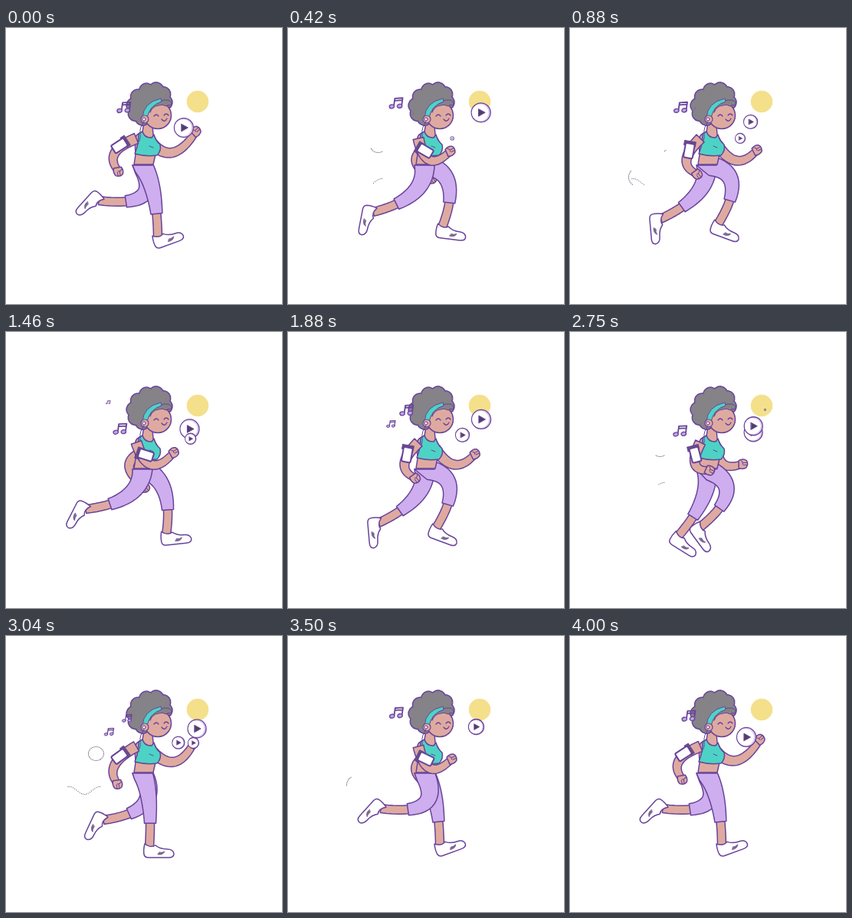
These frames come from a looping animation (360x360 px, 4.04 s). An HTML page with a canvas:

```html
<!DOCTYPE html>
<html lang="en">
<head>
<meta charset="utf-8">
<title>Runner</title>
<style>
html, body { margin: 0; width: 100%; height: 100%; overflow: hidden; background: #fff; }
canvas { display: block; }
</style>
</head>
<body>
<canvas id="stage" width="360" height="360"></canvas>
<script>
const ctx = document.getElementById('stage').getContext('2d');
const LOOP = 4040, STRIDE = 24, FPS = 24;
const INK = '#68439a', SKIN = '#deaaa0', PANTS = '#ceaeee', TEAL = '#4dd3c5', HAIR = '#858288', LILAC = '#dcc6f2';

// Key poses of one stride. Step, ankle x y, shoe angle
const LEG = [
  [0, 198, 273, -20], [1, 187, 275, 0], [5, 149, 272, 14], [9, 118, 249, 85], [11, 104, 231, 117],
  [12, 121, 225, 132], [13, 127, 240, 115], [17, 162, 254, 65], [21, 193, 256, 20], [23, 209, 264, -6]
];
// Step, elbow x y, hand x y, phone angle
const NEAR_ARM = [
  [0, 142, 163, 146, 186, -33], [1, 142, 168, 145, 192, -36],
  [11, 190, 173, 218, 158, -162], [21, 152, 172, 165, 190, -80]
];
const FAR_ARM = [
  [0, 219, 162, 247, 136], [1, 220, 164, 244, 141],
  [11, 161, 172, 180, 202], [21, 217, 173, 243, 160]
];
// Start ms, life ms, sideways shift, radius
const BUBBLES = [
  [3640, 950, 0, 12.5], [350, 960, -2, 9], [640, 1500, 2, 12.5], [1200, 620, 9, 7], [1600, 850, 0, 9],
  [2000, 760, -3, 8], [2100, 1320, 4, 12], [2400, 600, 0, 12], [2800, 1000, 1, 10], [2750, 640, 11, 7]
];
// Start ms, life ms, starting height
const NOTES = [
  [3720, 1050, 108], [400, 800, 112], [860, 625, 105], [1040, 910, 133],
  [1606, 980, 106], [2130, 1000, 138], [2880, 900, 110]
];

function pose(keys, step) {
  const s = step % STRIDE, ring = [...keys, [STRIDE, ...keys[0].slice(1)]];
  const i = ring.findIndex(k => k[0] > s), a = ring[i - 1], b = ring[i];
  const u = (s - a[0]) / (b[0] - a[0]);
  return a.map((v, n) => v + (b[n] - v) * u).slice(1);
}

function ink(fill, width = 1.5) {
  ctx.fillStyle = fill;
  ctx.fill();
  ctx.strokeStyle = INK;
  ctx.lineWidth = width;
  ctx.stroke();
}

function path(d, fill, width = 1.5) {
  const p = new Path2D(d);
  if (fill) { ctx.fillStyle = fill; ctx.fill(p); }
  ctx.strokeStyle = INK;
  ctx.lineWidth = width;
  ctx.stroke(p);
}

function disc(x, y, r, fill, width) {
  ctx.beginPath();
  ctx.arc(x, y, r, 0, 7);
  if (width) return ink(fill, width);
  ctx.fillStyle = fill;
  ctx.fill();
}

function placed(x, y, degrees, scale, draw) {
  ctx.save();
  ctx.translate(x, y);
  ctx.rotate(degrees * Math.PI / 180);
  ctx.scale(scale, scale);
  draw();
  ctx.restore();
}

// Curve through three joints of [x, y, width], ten samples per bone
function spine(a, b, c) {
  const bend = b.map((v, n) => n < 2 ? (c[n] - a[n]) / 4 : 0);
  const sample = (p, q, side, u) => p.map((v, n) => {
    if (n === 2) return v + (q[n] - v) * u;
    return v * (1 - u) ** 2 + 2 * u * (1 - u) * (b[n] + side * bend[n]) + q[n] * u * u;
  });
  const line = [];
  for (let i = 0; i <= 20; i++) line.push(i < 10 ? sample(a, b, -1, i / 10) : sample(b, c, 1, i / 10 - 1));
  return line;
}

function limb(line, fill, flatTop) {
  const left = [], right = [];
  line.forEach(([x, y, w], i) => {
    const p = line[Math.max(i - 1, 0)], q = line[Math.min(i + 1, line.length - 1)];
    const a = flatTop && i === 0 ? Math.PI / 2 : Math.atan2(q[1] - p[1], q[0] - p[0]);
    const dx = -Math.sin(a) * w / 2, dy = Math.cos(a) * w / 2;
    left.push([x + dx, y + dy]);
    right.unshift([x - dx, y - dy]);
  });
  ctx.beginPath();
  [...left, ...right].forEach(p => ctx.lineTo(...p));
  ctx.closePath();
  ink(fill);
}

function shoe() {
  path('M-6-4Q-8 4-7 10Q-6 14-1 14L25 14Q32 14 32 9Q31 3 23 3Q14 3 8-2Q2 2-6-4Z', '#fff');
  path('M11 10Q18 11 20 6Q16 8 13 7Z', '#77717d', .6);
}

// The knee bends forward to let fixed bones reach from hip to ankle
function leg(step) {
  const [ax, ay, turn] = pose(LEG, step), hx = 178, hy = 179, thigh = 40, shin = 57;
  const dx = ax - hx, dy = ay - hy, d = Math.hypot(dx, dy);
  const along = (thigh ** 2 - shin ** 2 + d * d) / (2 * d);
  const out = Math.sqrt(Math.max(0, thigh ** 2 - along ** 2));
  const knee = [hx + (dx * along + dy * out) / d, hy + (dy * along - dx * out) / d, 19];
  const line = spine([hx, hy, 26], knee, [ax, ay, 11]);
  limb(line.slice(14).map(([x, y]) => [x, y, 11]), SKIN);
  limb(line.slice(0, 16), PANTS, true);
  placed(ax, ay, turn, 1, shoe);
}

function arm(sx, sy, [ex, ey, hx, hy]) {
  limb(spine([sx, sy, 14], [ex, ey, 12], [hx, hy, 9]), SKIN);
  placed(hx, hy, Math.atan2(hy - ey, hx - ex) * 180 / Math.PI, 1, () => {
    path('M-4-5Q2-8 6-5Q9-1 6 4Q2 7-4 5Z', SKIN);
    path('M7-2L2-2M7 1L2 1M-1-5Q2-3 1 0', null, 1);
  });
}

function phone() {
  path('M6-8L12-8L12 7L6 7Z', '#65507f', 1);
  ctx.beginPath();
  ctx.roundRect(-10, -6, 19, 12, 2);
  ink('#fff', 2);
}

function nearArm(step) {
  const sx = 170, sy = 144, joints = pose(NEAR_ARM, step), [ex, ey] = joints;
  arm(sx, sy, joints);
  placed(sx + (ex - sx) * .7 - 2, sy + (ey - sy) * .7 - 4, joints[4], 1, phone);
}

function torso() {
  path('M180 122L178 136Q169 137 168 147L169 165L167 178L192 178L195 165L200 155L196 146L192 139L191 127Z', SKIN);
  path('M173 138L178 135Q181 144 190 143L193 139Q195 147 201 152Q203 160 197 166Q182 168 168 164Q173 152 173 138Z', TEAL);
  path('M187 154L192 156', null, 1);
}

function hair() {
  placed(187, 99, -35, 1, () => {
    const curls = width => {
      for (let a = 0; a < 6.2; a += Math.PI / 5) disc(22 * Math.cos(a), 17 * Math.sin(a), 9, HAIR, width);
    };
    curls(3);
    curls();
    ctx.beginPath();
    ctx.ellipse(0, 0, 23, 18, 0, 0, 7);
    ctx.fill();
  });
}

function head() {
  hair();
  disc(198, 114, 17.5, SKIN, 1.5);
  path('M190 101Q198 93 212 94Q218 97 215 101Q211 99 209 102Q204 99 199 101Q191 102 188 110Z', HAIR, 1);
  path('M178 117Q179 97 202 92L203 96Q187 101 184 117Z', TEAL, 1);
  disc(181, 119, 5, SKIN, 1.2);
  disc(180, 119, 2, '#fff', 1);
  path('M180 122Q174 130 175 138T172 150', null, 1);
  path('M193 115Q196 111 199 115M206 114Q209 110 212 114M203 119Q207 124 210 118', null, 1.3);
}

function bubble(p, shift, size) {
  const x = 213 + 45 * p + shift, y = 149 - 45 * p + shift;
  const r = size * Math.min(1, p * 3.3, (1 - p) * 8);
  disc(x, y, r, LILAC, 1.3);
  disc(x - r * .08, y, r * .87, '#fff');
  placed(x, y, 0, r / 12, () => path('M-3-4.5L5 0L-3 4.5Z', '#51405f', 1));
}

function note(p, top) {
  const size = Math.min(1, p * 4, (1 - p) * 8);
  placed(164 - 32 * p, top - 14 * p, 8, size, () => {
    path('M-3 5L-3-6L7-8L7 3M-3-3L7-5', null, 1.8);
    for (const [x, y] of [[-5.5, 5], [4.5, 3]]) {
      ctx.beginPath();
      ctx.ellipse(x, y, 3.2, 2.5, -.3, 0, 7);
      ink('#c3a2e4', 1.3);
    }
  });
}

function drift(items, t, draw) {
  for (const [start, life, ...look] of items) {
    const p = (t - start + LOOP) % LOOP / life;
    if (p > 0 && p < 1) draw(p, ...look);
  }
}

// Dotted gust that draws itself leftward, then fades from its tail
function gust(t, start) {
  const u = (t - start) * .0017;
  if (u < 0 || u > 1.6) return;
  ctx.fillStyle = '#5c5068';
  const dot = (x, y) => ctx.fillRect(x, y, 1, 1);
  for (let s = 0; s < 1; s += .03) {
    if (s < u && s > u - .6) {
      const a = 2.2 + (s - .6) * 5;
      if (s < .6) dot(122 - s * 73, 201 - 5 * Math.cos(s * 11.5));
      else dot(88 + 12 * Math.cos(a), 194 + 12 * Math.sin(a));
    }
    if (s < u * 1.8 && s > 2.8 * u - 1.7) {
      const a = 1 + s * 6.28;
      dot(117 + 10 * Math.cos(a), 153 + 9 * Math.sin(a));
    }
  }
}

function render(t) {
  // Whole steps at 24 per second, on a 10 ms clock
  const step = Math.floor((Math.floor(t / 10) * 10 + 4.9) * FPS / 1000);
  const now = step * 1000 / FPS;
  ctx.fillStyle = '#fff';
  ctx.fillRect(0, 0, 360, 360);
  ctx.lineJoin = ctx.lineCap = 'round';

  disc(250, 96, 14.3, '#f4e08b');
  gust(now, 320);
  gust(now, 2690);

  arm(192, 152, pose(FAR_ARM, step));
  leg(step + STRIDE / 2);
  leg(step);
  torso();
  head();
  nearArm(step);

  drift(NOTES, now, note);
  drift(BUBBLES, now, bubble);
}

const begin = performance.now();
function tick() {
  render((performance.now() - begin) % LOOP);
  requestAnimationFrame(tick);
}
tick();
</script>
</body>
</html>
```
